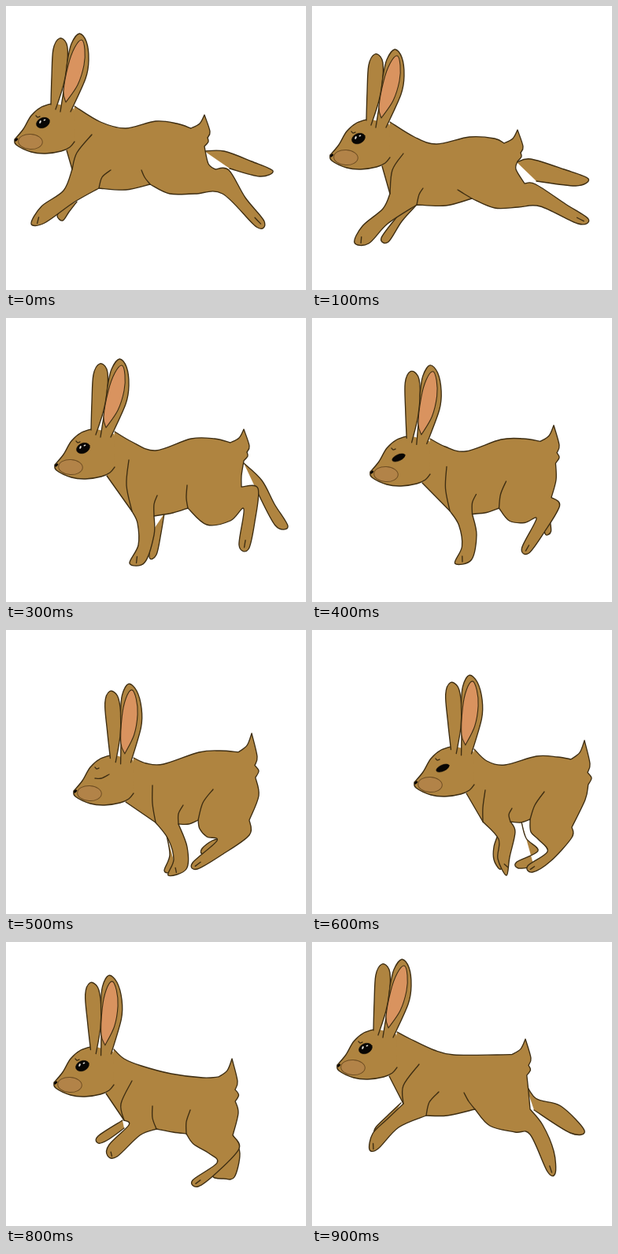
An HTML page for the animation above (1 s loop, 381x360 px).

```html
<!DOCTYPE html>
<html lang="en">
<head>
<meta charset="utf-8">
<title>Running rabbit</title>
<style>
html, body { margin: 0; width: 100%; height: 100%; overflow: hidden; background: #fff; }
svg { display: block; width: 381px; height: 360px; }
path, ellipse { fill: #af8440; stroke: #3d2d12; stroke-width: 1.35; stroke-linecap: round; stroke-linejoin: round; }
.line { fill: none; }
.patch { stroke: none; }
.pink { fill: #d9935f; stroke-width: 1.1; }
.muzzle { fill: #b28348; stroke: #6e4d22; stroke-width: 1; }
.dark { fill: #080604; stroke: #080604; stroke-width: .6; }
.glint { fill: #e8e4dc; stroke: none; }
.pose { visibility: hidden; animation: show 1s step-end infinite; }
@keyframes show { 0% { visibility: visible; } 10%, 100% { visibility: hidden; } }
</style>
</head>
<body>
<svg id="stage" viewBox="0 0 381 360"></svg>
<script>
const points = text => text.split(',').map(p => p.trim().split(' ').map(Number));
const lerp = (a, b, t) => a.map((v, k) => v + (b[k] - v) * t);
const add = (a, x, y) => [a[0] + x, a[1] + y];

// A pose: head and tail-tip places, tail length, outline points of each part
function pose(head, tip, tail, eye, turn, parts) {
  const shape = {};
  for (const name in parts) shape[name] = points(parts[name]);
  return { head, tip, tail, eye, turn, shape };
}

// Halfway pose; the hind legs may lag behind the rest
function between(a, b, eye, lag = .5) {
  const shape = {};
  for (const name in a.shape) {
    const t = /hind/i.test(name) ? lag : .5;
    const dx = (b.head[0] - a.head[0]) * (.5 - t);
    shape[name] = a.shape[name].map((p, i) => add(lerp(p, b.shape[name][i], t), dx, 0));
  }
  return {
    head: lerp(a.head, b.head, .5), tip: lerp(a.tip, b.tip, .5),
    tail: (a.tail + b.tail) / 2, turn: (a.turn + b.turn) / 2, eye, shape
  };
}

const stretch = pose([0, 0], [252, 138], 1, 'open', 0, {
  back: '120 147, 152 155, 190 146, 217 149',
  hind: '257 200, 266 207, 283 208, 304 243, 328 273, 318 280, 275 238, 240 238, 208 238, 183 226',
  fore: '152 233, 118 231, 86 249, 49 275, 32 276, 45 254, 73 234, 84 207',
  farHind: '252 184, 277 184, 312 197, 339 209, 322 216, 284 206',
  farFore: '72 255, 65 266, 72 272, 80 261, 90 248',
  folds: '109 163, 90 186, 133 208, 122 217, 172 208, 176 217'
});
const descend = pose([12, 20], [261, 157], 1, 'open', 0, {
  back: '130 166, 158 175, 200 166, 232 168',
  hind: '259 207, 270 225, 284 226, 322 251, 351 270, 338 276, 290 254, 262 255, 232 256, 203 244',
  fore: '170 253, 133 252, 96 276, 72 301, 54 300, 64 279, 90 257, 99 238',
  farHind: '260 198, 278 194, 320 207, 351 219, 335 228, 285 222',
  farFore: '108 267, 88 294, 97 299, 114 273, 132 253',
  folds: '116 187, 102 208, 141 231, 136 239, 185 233, 193 238'
});
const stand = pose([51, 17], [302, 141], 1, 'open', 0, {
  back: '160 157, 190 168, 235 153, 265 153',
  hind: '299 200, 299 214, 320 216, 316 258, 308 293, 296 288, 302 242, 285 257, 255 262, 231 241',
  fore: '212 247, 188 251, 188 275, 176 310, 157 311, 168 288, 167 260, 160 245',
  farHind: '302 184, 325 206, 341 236, 358 264, 342 263, 318 218',
  farFore: '186 270, 182 303, 191 300, 197 272, 201 248',
  folds: '156 180, 153 212, 192 225, 188 236, 230 212, 229 228'
});
const gather = pose([75, 35], [312, 131], 1.4, 'shut', -8, {
  back: '178 169, 200 170, 245 155, 272 153',
  hind: '321 210, 309 241, 309 260, 274 285, 243 303, 237 295, 268 267, 255 262, 246 252, 244 241',
  fore: '232 246, 219 246, 230 275, 229 303, 206 311, 213 291, 206 265, 190 244',
  farHind: '290 262, 275 264, 262 267, 249 277, 250 284, 270 280',
  farFore: '203 256, 208 285, 201 305, 210 307, 214 296',
  folds: '186 197, 186 220, 225 222, 219 233, 263 202, 250 219'
});
const crouch = pose([119, 24], [346, 140], 1.4, 'half', -8, {
  back: '222 166, 245 171, 285 160, 312 161',
  hind: '347 215, 330 250, 330 263, 303 293, 280 307, 274 299, 299 281, 288 266, 278 256, 277 240',
  fore: '265 244, 252 243, 258 256, 251 288, 247 311, 236 290, 237 265, 217 243',
  farHind: '266 243, 272 264, 287 280, 260 294, 262 302, 282 300',
  farFore: '236 260, 231 275, 231 291, 238 303, 244 300',
  folds: '220 203, 217 225, 254 226, 250 234, 295 205, 283 222'
});
const push = pose([50, 9], [287, 148], 1.35, 'open', -8, {
  back: '150 148, 172 157, 210 167, 250 172',
  hind: '295 217, 288 245, 296 262, 268 292, 244 310, 237 302, 268 280, 258 268, 238 256, 229 243',
  fore: '212 241, 191 237, 170 245, 141 272, 129 271, 131 257, 156 232, 150 226',
  farHind: '289 246, 297 268, 290 298, 276 300, 265 299, 262 296',
  farFore: '148 226, 117 246, 117 255, 129 251, 150 236',
  folds: '160 176, 146 205, 186 208, 186 223, 234 213, 229 228'
});
const leap = pose([21, -13], [271, 123], 1.15, 'open', 0, {
  back: '125 123, 155 137, 180 143, 235 143',
  hind: '275 190, 277 212, 293 232, 307 265, 309 293, 299 291, 277 244, 258 241, 226 233, 207 212',
  fore: '172 220, 145 220, 110 235, 84 262, 73 263, 77 243, 95 225, 116 205',
  farHind: '268 172, 284 198, 316 208, 346 239, 328 242, 282 213',
  farFore: '113 204, 95 221, 81 235, 80 242, 94 236',
  folds: '136 155, 116 182, 161 190, 149 203, 193 191, 199 202'
});
const poses = [
  stretch, descend, between(descend, stand, 'open', .1), stand, between(stand, gather, 'half'),
  gather, crouch, between(crouch, push, 'open'), push, leap
];

// Catmull-Rom curve through each run; runs meet in sharp corners
function curve(...runs) {
  let last, d = '';
  for (const run of runs) {
    const p = last ? [last, ...run] : run;
    if (!last) d = 'M' + p[0];
    for (let i = 0; i < p.length - 1; i++) {
      const a = p[i - 1] || p[i], b = p[i], c = p[i + 1], e = p[i + 2] || c;
      const c1 = b.map((v, k) => v + (c[k] - a[k]) / 6);
      const c2 = c.map((v, k) => v - (e[k] - b[k]) / 6);
      d += `C${c1} ${c2} ${c}`;
    }
    last = p[p.length - 1];
  }
  return d;
}

const path = (d, cls = '') => `<path class="${cls}" d="${d}"/>`;
const draw = (text, cls) => path(curve(points(text)), cls);
const line = (...p) => path(curve(p), 'line');
const oval = (cls, x, y, rx, ry, turn = 0) =>
  `<ellipse class="${cls}" cx="${x}" cy="${y}" rx="${rx}" ry="${ry}" transform="rotate(${turn} ${x} ${y})"/>`;

const eyes = {
  open: oval('dark', 47, 148, 8.8, 6.3, -24) + oval('glint', 43.5, 147, 1, 2, 25) + oval('glint', 49, 144.5, 1.5, .7, -20),
  half: oval('dark', 47, 151, 8.8, 3.9, -24),
  shut: draw('38 153, 46 153, 56 148', 'line')
};
const skull = curve(points('61 123, 45 128, 32 139, 22 156, 11 169'),
  points('13 176, 32 185, 50 187, 70 184, 81 179, 87 172'));
const face = path(skull + 'L86 130Z', 'patch') + path(skull, 'line') +
  oval('muzzle', 31, 172, 15.3, 9.6, 3) + oval('dark', 13, 169.5, 2.2, 1.3, -40) +
  draw('38 139, 40 141, 43 140', 'line');
const ears =
  draw('57 125, 58 90, 60 55, 68 41, 77 48, 78 70, 73 100, 63 131') +
  draw('69 134, 75 95, 78 70, 83 48, 93 35, 102 45, 105 68, 101 92, 82 134') +
  draw('76 122, 73 108, 79 75, 87 53, 96 43, 100 55, 99 75, 91 100, 76 122', 'pink');

const head = p => `<g transform="translate(${p.head})">${face}${eyes[p.eye]}` +
  `<g transform="rotate(${p.turn} 75 123)">${ears}</g></g>`;

function body({ head, tip, tail: k, shape: { back, hind, fore } }) {
  const at = (x, y) => add(tip, x, y * k);
  return path(curve(
    [add(head, 87, 127), ...back, at(-17, 17)],
    [at(-6, 11), tip],
    [at(7, 21), at(4, 29)],
    [at(10 * k - 5, 34), at(12 * k - 12, 40)],
    hind.slice(0, 2), hind.slice(2), fore.slice(0, 2), fore.slice(2),
    [add(head, 77, 183)]));
}

// A toe mark runs from the foot's end back along the leg
function toe(a, b, up, len) {
  const from = lerp(a, b, .45);
  return line(from, lerp(from, up, len));
}

function rabbit(p) {
  const { hind, fore, farHind, farFore, folds: f } = p.shape;
  return path(curve(farHind)) + path(curve(farFore)) + body(p) +
    line(f[0], f[1], fore[7]) + line(f[2], f[3], fore[1]) + line(f[4], f[5], hind[9]) +
    toe(fore[4], fore[3], fore[5], .36) +
    toe(hind[4], hind[5], lerp(hind[3], hind[6], .5), .22) + head(p);
}

document.getElementById('stage').innerHTML = poses.map((p, i) =>
  `<g class="pose" style="animation-delay:${i * 100 - 1000}ms">${rabbit(p)}</g>`).join('');
</script>
</body>
</html>
```
